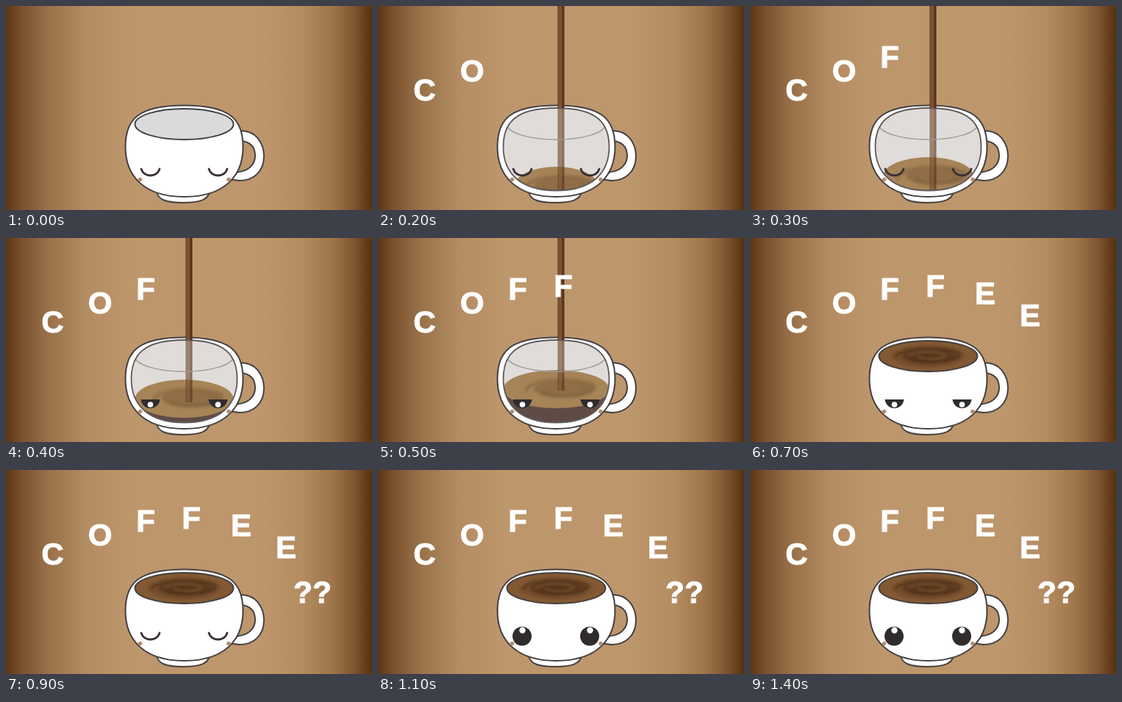
An HTML page for the animation above (1500 ms loop, 498 by 278 pixels).

```html
<!DOCTYPE html>
<html lang="en">
<head>
<meta charset="utf-8">
<title>Coffee cup</title>
<style>
  html, body { margin: 0; width: 100%; height: 100%; overflow: hidden; background: #bc946a; }
  svg { display: block; width: 100vw; height: 100vh; }
  text { font: bold 42px "Liberation Sans", Arial, sans-serif; text-anchor: middle; fill: #fff; stroke: #fff; stroke-width: 1; }
  .line { stroke: #434042; stroke-width: 2; stroke-linejoin: round; }
</style>
</head>
<body>
<svg viewBox="0 0 498 278" preserveAspectRatio="none">
  <defs>
    <linearGradient id="wall">
      <stop offset="0" stop-color="#5f3513"/>
      <stop offset=".04" stop-color="#79502b"/>
      <stop offset=".12" stop-color="#9b734b"/>
      <stop offset=".22" stop-color="#b48c63"/>
      <stop offset=".34" stop-color="#be966c"/>
      <stop offset=".7" stop-color="#be966c"/>
      <stop offset=".81" stop-color="#b48c62"/>
      <stop offset=".89" stop-color="#9f764c"/>
      <stop offset=".95" stop-color="#805630"/>
      <stop offset="1" stop-color="#56310f"/>
    </linearGradient>
    <linearGradient id="pour">
      <stop offset="0" stop-color="#5c3a20"/>
      <stop offset=".3" stop-color="#825735"/>
      <stop offset=".55" stop-color="#7a5030"/>
      <stop offset=".75" stop-color="#56331d"/>
      <stop offset="1" stop-color="#50301c"/>
    </linearGradient>
    <radialGradient id="brew">
      <stop offset="0" stop-color="#5a381f"/>
      <stop offset=".5" stop-color="#6c4527"/>
      <stop offset=".85" stop-color="#835a33"/>
      <stop offset="1" stop-color="#805730"/>
    </radialGradient>
    <filter id="soft" x="-20%" y="-60%" width="140%" height="220%"><feGaussianBlur stdDeviation="1.6"/></filter>
    <clipPath id="inside"><path id="bowl" d="M170.500 192C170.500 160 186 139 242.500 139C299 139 314.500 160 314.500 192C314.500 228 291 251.500 242.500 251.500C194 251.500 170.500 228 170.500 192Z"/></clipPath>
    <g id="swirl" fill="none" stroke-linecap="round" filter="url(#soft)">
      <ellipse cx="4" cy="1" rx="38" ry="9" fill="#4f301b" opacity=".55"/>
      <path d="M-45 2C-38 -11 22 -13 44 -3C48 8 -4 13 -24 5" stroke="#4c2d18" stroke-width="3" opacity=".65"/>
      <path d="M-27 1C-14 -7 18 -6 25 0C20 6 -6 6 -13 2" stroke="#8a6139" stroke-width="2" opacity=".6"/>
    </g>
  </defs>

  <rect width="498" height="278" fill="url(#wall)"/>

  <g class="line" fill="#fff">
    <path fill-rule="evenodd" d="M318 170C340 169 351 187 351 205C351 226 336 238 318 238L303 236L316 226C330 225 339 216 339 204C339 192 332 184 318 184Z"/>
    <path d="M205 252C206 264 218 268 241 268C264 268 275 264 277 253Z"/>
    <path d="M162.500 192C162.500 154 180 135.500 242.500 135.500C305 135.500 322.500 154 322.500 192C322.500 231 298 260 242.500 260C187 260 162.500 231 162.500 192Z"/>
    <ellipse id="empty" cx="242.500" cy="161" rx="67" ry="21" fill="#dadadb"/>
  </g>

  <g id="full">
    <ellipse class="line" cx="242.500" cy="161" rx="67" ry="21" fill="url(#brew)"/>
    <use href="#swirl" x="242" y="160"/>
  </g>

  <g id="cut">
    <use href="#bowl" fill="#e0dcda"/>
    <g id="coffee" clip-path="url(#inside)">
      <rect id="depth" x="165" width="155" height="120" fill="#5f4b45"/>
      <ellipse id="top" cx="242.500" fill="#a68458"/>
      <g id="puddle"><use href="#swirl" opacity=".5"/></g>
    </g>
    <rect id="inPour" x="244.500" y="139" width="9" fill="url(#pour)" opacity=".65"/>
    <path d="M175.500 161A67 21 0 0 0 309.500 161" clip-path="url(#inside)" fill="none" stroke="#a09c9b" stroke-width="1.500"/>
    <use href="#bowl" fill="none" stroke="#5d5858" stroke-width="1.800"/>
  </g>
  <rect id="outPour" x="244.500" width="9" fill="url(#pour)"/>

  <g fill="#b38c6d"><circle cx="182.500" cy="236.500" r="2.800"/><circle cx="303" cy="236.500" r="2.800"/></g>
  <g id="eyes"></g>
  <g id="letters"></g>
</svg>
<script>
const $ = id => document.getElementById(id);
const set = (id, attrs) => { for (const k in attrs) $(id).setAttribute(k, attrs[k]); };
const show = (el, on) => { el.style.display = on ? "" : "none"; };

const word = [["C", 63.5, 129], ["O", 128, 102.5], ["F", 190, 83.5], ["F", 252, 80],
  ["E", 320, 89.5], ["E", 381, 120], ["?", 404, 181], ["?", 430, 181]];
$("letters").innerHTML = word.map(([c, x, y]) => `<text x="${x}" y="${y}">${c}</text>`).join("");

const looks = {
  closed: x => `<path d="M${x - 12.5} 222C${x - 9} 234 ${x + 9} 234 ${x + 12.5} 222" fill="none" stroke="#3a3033" stroke-width="2.800" stroke-linecap="round"/>`,
  half: x => `<path d="M${x - 13} 220H${x + 13}C${x + 11} 236 ${x - 11} 236 ${x - 13} 220Z" fill="#302b2d"/><circle cx="${x}" cy="227" r="3.800" fill="#fff"/>`,
  open: x => `<circle cx="${x - .5}" cy="226.500" r="13" fill="#302c2e"/><circle cx="${x}" cy="218.500" r="4.200" fill="#fff"/>`
};
$("eyes").innerHTML = Object.values(looks).map(draw => `<g>${draw(196.5)}${draw(288.5)}</g>`).join("");

const LOOP = 1500, STEP = 100;
let last = -1;

function eyeLook(n) {
  if (n < 4 || n === 9) return 0;
  return n < 11 ? 1 : 2;
}

function render(ms) {
  const n = Math.floor(ms % LOOP / STEP);
  if (n === last) return;
  last = n;

  const count = Math.round(n * 6 / 7);
  [...$("letters").children].forEach((el, i) => show(el, i < count));
  [...$("eyes").children].forEach((el, i) => show(el, i === eyeLook(n)));

  const pouring = n > 0 && n < 7;
  const wet = n > 1;
  show($("full"), n >= 7);
  show($("empty"), n < 2);
  show($("cut"), pouring);
  show($("outPour"), pouring);
  if (!pouring) return;

  // The surface rises from the bottom of the bowl and widens with it.
  const level = 232 - (n - 3) * 13;
  set("cut", { opacity: wet ? 1 : .5 });
  show($("coffee"), wet);
  show($("inPour"), wet);
  set("depth", { y: level });
  set("top", { cy: level, rx: Math.min(72, 72 - (level - 206) * .4), ry: 26 });
  set("puddle", { transform: `translate(248 ${level - 1}) scale(1.05 1.2)` });
  set("inPour", { height: Math.min(level + 2 + Math.max(0, level - 216), 250) - 139 });
  set("outPour", { height: wet ? 139 : 130 });
}

const start = performance.now();
function tick() {
  render(performance.now() - start);
  requestAnimationFrame(tick);
}
tick();
</script>
</body>
</html>
```
